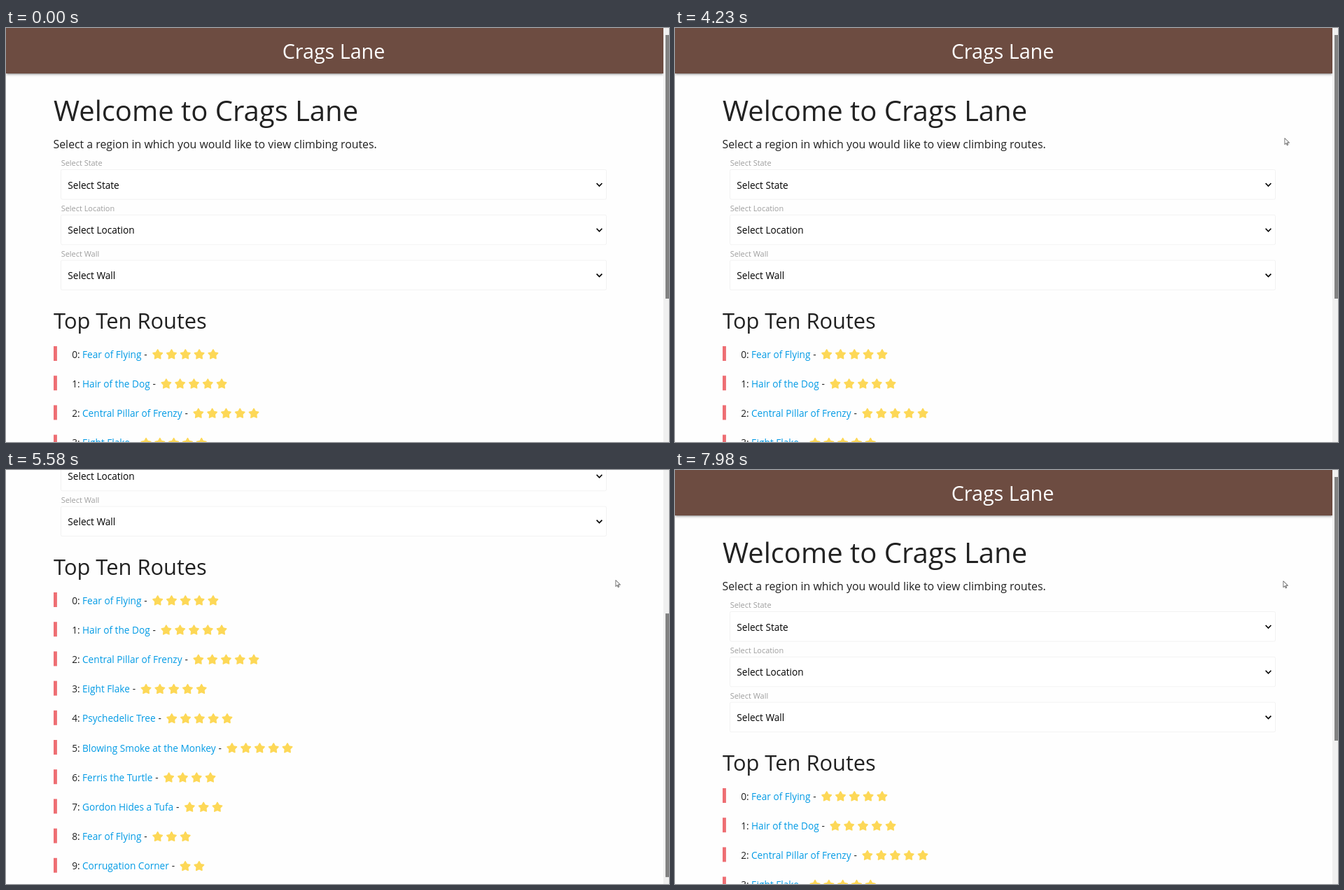
Recreate the animation shown at these times as an HTML page. Size 947 by 592 pixels, loop 8000 ms.

```html
<!DOCTYPE html>
<html lang="en">
<head>
<meta charset="utf-8">
<title>Crags Lane</title>
<style>
  html, body { margin: 0; width: 100%; height: 100%; overflow: hidden; background: #fefefe; }
  #stage { position: relative; width: 947px; height: 592px; overflow: hidden; }
  #page, #page svg, #bar, #thumb, #cursor, header { position: absolute; left: 0; top: 0; }
  header {
    width: 939px; height: 64.5px; background: #6d4c41;
    box-shadow: 0 2px 2px rgba(0,0,0,.14), 0 3px 1px -2px rgba(0,0,0,.12), 0 1px 5px rgba(0,0,0,.2);
  }
  #bar { left: 939px; width: 8px; height: 592px; background: #f0f0f0; }
  #thumb { left: 2.5px; top: 10px; width: 5.5px; height: 376.5px; background: #828282; }
  text { font: 13.65px "Open Sans", "Noto Sans", sans-serif; fill: #212121; white-space: pre; }
  .brand { font-size: 28.7px; fill: #fff; text-anchor: middle; }
  .title { font-size: 40px; }
  .subtitle { font-size: 30.8px; }
  .intro { font-size: 15.88px; }
  .label { font-size: 10.95px; fill: #9e9e9e; }
  .option { fill: #000; }
  .link { fill: #039be5; }
  .field { fill: #fff; stroke: #f2f2f2; }
  .chevron { fill: none; stroke: #000; stroke-width: 1.6; }
  .star { fill: #fdd857; stroke: #fdd857; stroke-width: 1.6; stroke-linejoin: round; }
</style>
</head>
<body>
<div id="stage">
  <div id="page">
    <header></header>
    <svg id="content" width="939" height="880"></svg>
  </div>
  <div id="bar"><div id="thumb"></div></div>
  <svg id="cursor" width="10" height="14">
    <path d="M.5 .5V9.6L2.6 7.6L4 10.7L5.4 10.1L4 7H7.2Z" fill="#fff" stroke="#444" stroke-width=".9"/>
  </svg>
</div>
<script>
const LOOP = 8000;
const STEP = 70;
const byId = id => document.getElementById(id);

const routes = [
  { name: "Fear of Flying", stars: 5 },
  { name: "Hair of the Dog", stars: 5 },
  { name: "Central Pillar of Frenzy", stars: 5 },
  { name: "Eight Flake", stars: 5 },
  { name: "Psychedelic Tree", stars: 5 },
  { name: "Blowing Smoke at the Monkey", stars: 5 },
  { name: "Ferris the Turtle", stars: 4 },
  { name: "Gordon Hides a Tufa", stars: 3 },
  { name: "Fear of Flying", stars: 3 },
  { name: "Corrugation Corner", stars: 2 },
];

const text = (x, y, str, cls = "") => `<text x="${x}" y="${y}" class="${cls}">${str}</text>`;

const measure = document.createElement("canvas").getContext("2d");
measure.font = '13.65px "Open Sans", "Noto Sans", sans-serif';

const starPoints = Array.from({ length: 10 }, (_, i) => {
  const angle = i * Math.PI / 5, r = i % 2 ? 3.8 : 7;
  return [r * Math.sin(angle), -r * Math.cos(angle)];
}).join(" ");

const star = (x, y) =>
  `<polygon class="star" points="${starPoints}" transform="translate(${x} ${y})"/>`;

function selectBox(name, i) {
  const y = 202.5 + i * 64.8;
  return text(78.7, y - 5.5, name, "label")
    + `<rect class="field" x="78.5" y="${y}" width="779" height="42.5" rx="2"/>`
    + text(88.3, y + 27, name, "option")
    + `<path class="chevron" d="M843.6 ${y + 19.5}l3.9 4l3.9 -4"/>`;
}

function routeRow({ name, stars }, i) {
  const y = 471.5 + i * 42.2;
  const linkEnd = 109 + measure.measureText(name).width;
  let row = `<rect x="68" y="${y - 16.5}" width="4.9" height="21" fill="#ee6e73"/>`
    + text(94.3, y, i + ":") + text(109, y, name, "link") + text(linkEnd + 3.9, y, "-");
  for (let k = 0; k < stars; k++) row += star(linkEnd + 23.2 + k * 19.8, y - 4.5);
  return row;
}

byId("content").innerHTML =
  text(468, 44, "Crags Lane", "brand")
  + text(68, 133, "Welcome to Crags Lane", "title")
  + text(67.5, 171.5, "Select a region in which you would like to view climbing routes.", "intro")
  + ["Select State", "Select Location", "Select Wall"].map(selectBox).join("")
  + text(68, 430, "Top Ten Routes", "subtitle")
  + routes.map(routeRow).join("");

// The pointer starts just below the stage
const pointerStart = { x: 909, y: 592 };
const pointerMoves = [
  { start: 590, end: 940, x: 801, y: 339 },
  { start: 1200, end: 1760, x: 767, y: 160 },
  { start: 1830, end: 1900, x: 770, y: 164 },
  { start: 2030, end: 2310, x: 797, y: 154 },
  { start: 2780, end: 3350, x: 876, y: 160 },
  { start: 3620, end: 4030, x: 870.3, y: 157 },
  { start: 7910, end: 7980, x: 868.3, y: 158.2 },
];
const scrollMoves = [
  { start: 4690, end: 5170, y: 217.5 },
  { start: 5370, end: 5580, y: 280 },
  { start: 6900, end: 7450, y: 0 },
];

// Smoothstep that gets going early and settles slowly
function ease(p) {
  const q = 1 - (1 - p) ** 1.43;
  return q * q * (3 - 2 * q);
}

// The screen updates in steps; the first one shows at start, the last one at end
function progress({ start, end }, t) {
  if (t < start) return 0;
  const intervals = Math.round((end - start) / STEP);
  const done = Math.floor((t - start) / (end - start) * intervals + 1e-6);
  return ease(Math.min(1, (done + 1) / (intervals + 1)));
}

const follow = (from, moves, axis, t) =>
  moves.reduce((value, move) => value + (move[axis] - value) * progress(move, t), from);

function draw() {
  const t = performance.now() % LOOP;
  const scroll = follow(0, scrollMoves, "y", t);
  const x = follow(pointerStart.x, pointerMoves, "x", t);
  const y = follow(pointerStart.y, pointerMoves, "y", t);
  byId("page").style.transform = `translateY(${-scroll}px)`;
  byId("thumb").style.transform = `translateY(${scroll * 0.697}px)`;
  byId("cursor").style.transform = `translate(${x}px, ${y}px)`;
  requestAnimationFrame(draw);
}
draw();
</script>
</body>
</html>
```
